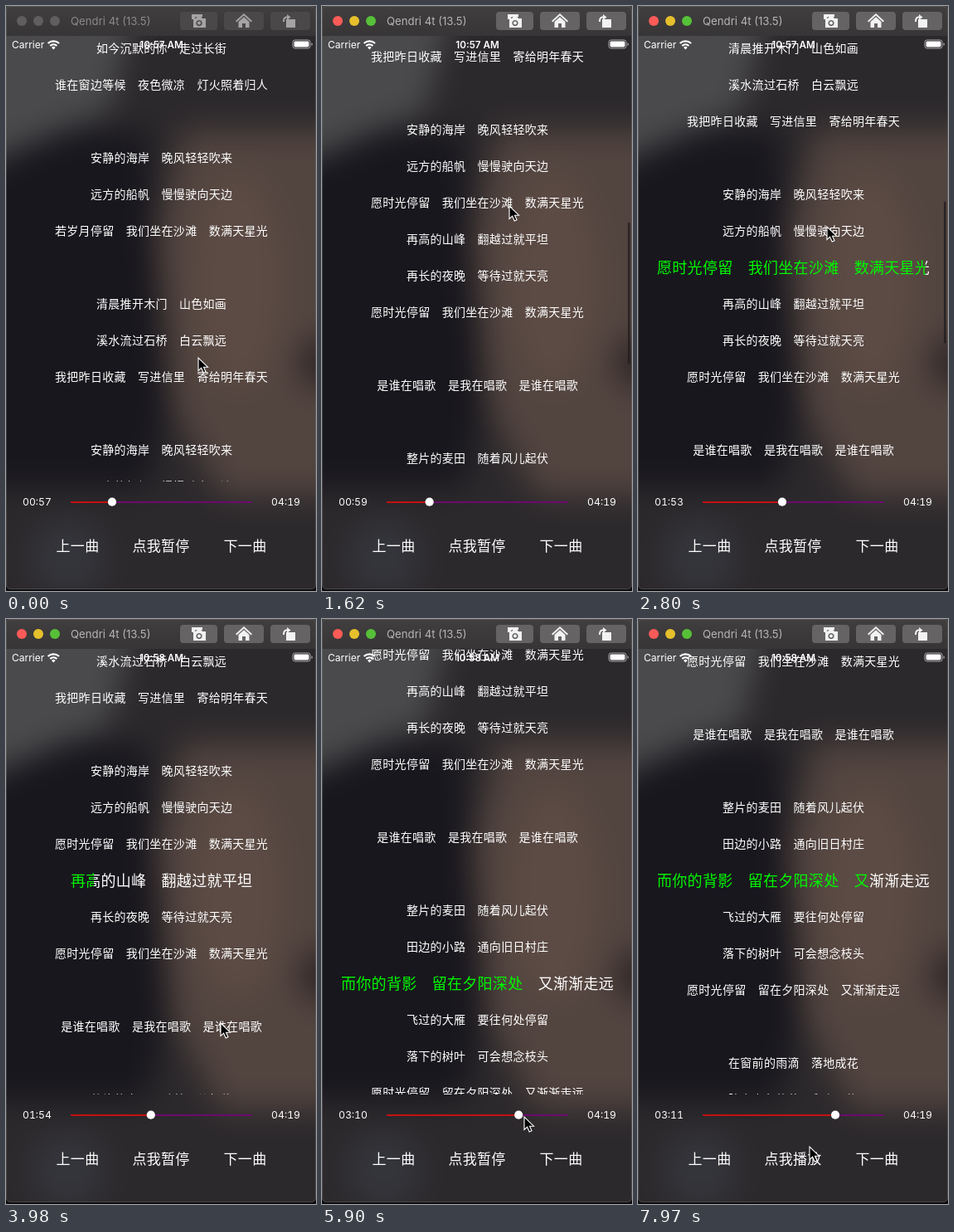
Animation of 374x705 px, one loop 8 s. Source, as an HTML page:

```html
<!DOCTYPE html>
<html lang="zh-CN">
<head>
<meta charset="utf-8">
<style>
html, body { margin: 0; width: 100%; height: 100%; overflow: hidden; background: #0c0c0f; }
svg { display: block; position: absolute; left: 0; top: 0; }
text { fill: #fff; font-family: Inter, "Noto Sans CJK SC", "Noto Sans CJK", sans-serif; font-size: 12px; }
.cjk text { font-family: "Noto Sans CJK SC", "Noto Sans CJK", sans-serif; font-size: 14px; letter-spacing: .28px; text-anchor: middle; }
.cjk .current { font-size: 18px; fill: url(#karaoke); }
.buttons text { font-size: 17px; }
.time { font-size: 12.2px; font-variant-numeric: tabular-nums; }
#title { font-size: 13.2px; fill: #8b898a; }
.light { fill: #605e5f; }
.tool { fill: #4a4849; }
.icon { fill: #a5a3a4; }
.active #title { fill: #b7b5b6; }
.active .tool { fill: #656364; }
.active .icon { fill: #f2f2f2; }
.active .red { fill: #fc5b57; }
.active .yellow { fill: #e6c02c; }
.active .green { fill: #56c038; }
</style>
</head>
<body>
<svg width="374" height="705" style="will-change:transform">
  <defs>
    <filter id="soft" filterUnits="userSpaceOnUse" x="-80" y="-80" width="540" height="870" color-interpolation-filters="sRGB">
      <feGaussianBlur stdDeviation="18"/>
    </filter>
    <clipPath id="window"><rect width="374" height="703" rx="5"/></clipPath>
  </defs>
  <g clip-path="url(#window)">
    <g filter="url(#soft)">
      <path d="M-80 -80H460V790H-80Z" fill="#2c292c"/>
      <path d="M-80 150H170L195 480L170 580H-80Z" fill="#18171d"/>
      <path d="M215 150H460V590H260L200 480L180 280Z" fill="#52443f"/>
      <ellipse cx="280" cy="330" rx="55" ry="130" fill="#5c4b44"/>
      <path d="M-80 -80H175L125 125L-80 215Z" fill="#4a4a4c"/>
      <circle cx="385" cy="430" r="30" fill="#2c2425"/>
      <circle cx="75" cy="665" r="45" fill="#34353b"/>
    </g>
  </g>
</svg>
<svg id="stage" width="374" height="705">
  <defs>
    <clipPath id="page"><rect y="36" width="374" height="537"/></clipPath>
    <linearGradient id="karaoke" gradientUnits="userSpaceOnUse" x1="0" x2="374" y1="0" y2="0">
      <stop class="edge" stop-color="#00f800"/><stop class="edge" stop-color="#fff"/>
    </linearGradient>
    <linearGradient id="bar" x2="0" y2="1"><stop stop-color="#403e3f"/><stop offset="1" stop-color="#373536"/></linearGradient>
  </defs>

  <g clip-path="url(#page)"><g id="lyrics" class="cjk"></g></g>
  <rect id="scrollbar" x="369" width="2.6" height="171" rx="1.3" fill="#1f1b1c" opacity=".75"/>

  <text x="7" y="50.5">Carrier</text>
  <g fill="none" stroke="#fff" stroke-width="2.2">
    <path d="M50.6 45a9.6 9.6 0 0 1 13.4 0M53.2 48a6 6 0 0 1 8.2 0"/>
    <path d="M57.3 52.4L55 49.9a3.4 3.4 0 0 1 4.6 0Z" fill="#fff" stroke="none"/>
  </g>
  <text id="clock" x="187.5" y="50.5" text-anchor="middle" font-weight="600" style="font-size:11.7px"></text>
  <rect x="346" y="41" width="21" height="10" rx="2.6" fill="none" stroke="#aaa"/>
  <rect x="347.5" y="42.5" width="18" height="7" rx="1.4" fill="#fff"/>
  <path d="M368.5 44.2a2 2 0 0 1 0 3.8Z" fill="#aaa"/>

  <text id="elapsed" class="time" x="20" y="602.4"></text>
  <text class="time" x="355" y="602.4" text-anchor="end">04:19</text>
  <path d="M79 598H296" stroke="#6c0a6e" stroke-width="2.2" stroke-linecap="round"/>
  <path id="played" stroke="#c51010" stroke-width="2.2" stroke-linecap="round"/>
  <circle id="knob" cy="597.7" r="5.1" fill="#fff"/>
  <g class="cjk buttons">
    <text x="86.5" y="656.5">上一曲</text>
    <text id="toggle" x="187" y="656.5"></text>
    <text x="288.5" y="656.5">下一曲</text>
  </g>

  <rect width="374" height="36" fill="url(#bar)"/>
  <circle class="light red" cx="19" cy="18" r="6"/>
  <circle class="light yellow" cx="39" cy="18" r="6"/>
  <circle class="light green" cx="59" cy="18" r="6"/>
  <text id="title" x="78" y="22.7">Qendri 4t (13.5)</text>
  <rect class="tool" x="210" y="7" width="45" height="22" rx="4"/>
  <rect class="tool" x="263" y="7" width="48" height="22" rx="4"/>
  <rect class="tool" x="319" y="7" width="48" height="22" rx="4"/>
  <path class="icon" d="M224 10h13v3h-8l-2 3h-3Z"/>
  <path class="icon" fill-rule="evenodd" d="M226 15h3l1.500-2h5l1.500 2h4v11h-15Zm7 2a3.600 3.600 0 1 0 .01 0Zm0 1.600a2 2 0 1 1-.01 0Z"/>
  <path class="icon" d="M287 9l10 9-1.300 1.400L287 11.600l-8.700 7.800L277 18ZM287 13.200l6.500 5.800v7H289v-5h-4v5h-4.500v-7Z"/>
  <path class="icon" d="M338 16h11v10h-11ZM334 19c0-5 2-6.500 5-6.500V10l4.500 3.500-4.500 3.500v-2.500c-2 0-3 .8-3 4.500Z"/>

  <rect x=".5" y=".5" width="373" height="702" rx="5" fill="none" stroke="#777" stroke-opacity=".4"/>
  <path id="cursor" d="M0 0V15.500L3.600 12.200L6.200 18L9 16.800L6.500 11.200H11.500Z" fill="#000" stroke="#fff" stroke-width="1.100"/>
</svg>
<script>
const LOOP = 8000, STEP = 147.5;
const ROW = 44, FIRST_Y = 51, CENTER_X = 187.6, GLYPH = 18.28;
const PAUSE = 7530, DRAG_START = 4580, DRAG_END = 5610, RELEASE = 5720;
const $ = id => document.getElementById(id);

const shore = '安静的海岸　晚风轻轻吹来';
const sail = '远方的船帆　慢慢驶向天边';
const stars = '愿时光停留　我们坐在沙滩　数满天星光';
const lines = [
  '如今沉默的你　走过长街',
  '谁在窗边等候　夜色微凉　灯火照着归人', '',
  shore, sail, '若岁月停留　我们坐在沙滩　数满天星光', '',
  '清晨推开木门　山色如画',
  '溪水流过石桥　白云飘远',
  '我把昨日收藏　写进信里　寄给明年春天', '',
  shore, sail, stars,
  '再高的山峰　翻越过就平坦',
  '再长的夜晚　等待过就天亮',
  stars, '',
  '是谁在唱歌　是我在唱歌　是谁在唱歌', '',
  '整片的麦田　随着风儿起伏',
  '田边的小路　通向旧日村庄',
  '而你的背影　留在夕阳深处　又渐渐走远',
  '飞过的大雁　要往何处停留',
  '落下的树叶　可会想念枝头',
  '愿时光停留　留在夕阳深处　又渐渐走远', '',
  '在窗前的雨滴　落地成花',
  '院中青色的藤　爬上屋檐'
];

// Song position at each seek, and the lines reached, in seconds.
const seeks = [{ at: 0, sec: 57.71 }, { at: 2200, sec: 113 }, { at: RELEASE, sec: 190 }];
const cues = [
  { line: 7, start: 58, length: 5.3 },
  { line: 13, start: 95.88, length: 18 },
  { line: 14, start: 113.88, length: 7.1 },
  { line: 22, start: 177.8, length: 18 }
];
const hand = [
  { from: 0, to: 0, x: 232, y: 424 },
  { from: 295, to: 1040, x: 233, y: 285 },      // drag the lyrics
  { from: 1040, to: 1620, x: 226, y: 241 },
  { from: 2210, to: 2800, x: 228, y: 266 },     // tap a line
  { from: 3250, to: 3980, x: 259, y: 487 },
  { from: 3980, to: DRAG_START, x: 177, y: 598 },
  { from: DRAG_START, to: DRAG_END, x: 244, y: 600 },
  { from: 6200, to: 7240, x: 197, y: 650 },     // pause
  { from: 7820, to: 7965, x: 207, y: 636 }
];

const lastBefore = (list, key, value) => list.filter(item => item[key] <= value).pop();

function ease(t, from, to) {
  const u = Math.min(1, Math.max(0, (t - from) / (to - from || 1)));
  return u * u * (3 - 2 * u);
}

function songAt(t) {
  const seek = lastBefore(seeks, 'at', t);
  return seek.sec + (Math.min(t, PAUSE) - seek.at) / 1000;
}

// Each new line scrolls to the middle in 300 ms; one fling moves the list freely.
function scrollAt(t) {
  return ROW * (ease(t, 290, 590) + ease(t, 3090, 3390) + 8 * ease(t, 5720, 6020))
    + 348 * ease(t, 830, 1690) - 84 * ease(t, 2200, 2510);
}

function handAt(t) {
  return hand.reduce((p, move) => {
    const u = ease(t, move.from, move.to);
    return { x: p.x + (move.x - p.x) * u, y: p.y + (move.y - p.y) * u };
  }, hand[0]);
}

const rows = lines.map(content => {
  const el = document.createElementNS('http://www.w3.org/2000/svg', 'text');
  el.setAttribute('x', CENTER_X);
  el.textContent = content;
  return $('lyrics').appendChild(el);
});

function drawLyrics(t) {
  const song = songAt(t), scroll = scrollAt(t);
  const cue = lastBefore(cues, 'start', song);
  rows.forEach((el, i) => {
    const current = Boolean(cue) && i === cue.line;
    el.classList.toggle('current', current);
    el.setAttribute('y', FIRST_Y + ROW * i + (current ? 18 : 14) * .38);
  });
  if (cue) {
    const width = lines[cue.line].length * GLYPH;
    const edge = CENTER_X + width * ((song - cue.start) / cue.length - .5);
    document.querySelectorAll('.edge').forEach(stop => stop.setAttribute('offset', edge / 374));
  }
  $('lyrics').setAttribute('transform', `translate(0 ${-scroll})`);
  $('scrollbar').setAttribute('y', 136.4 + .322 * scroll);
  $('scrollbar').style.display = t > 700 && t < 3090 ? '' : 'none';
}

function drawPlayer(t) {
  const dragging = t > DRAG_START && t < RELEASE;
  const seconds = dragging ? 115 + 75 * ease(t, DRAG_START, DRAG_END) : Math.floor(songAt(t));
  const knobX = 81.2 + .821 * seconds;
  const pad = n => String(Math.floor(n)).padStart(2, '0');
  $('elapsed').textContent = pad(seconds / 60) + ':' + pad(seconds % 60);
  $('knob').setAttribute('cx', knobX);
  $('played').setAttribute('d', `M79 598H${knobX}`);
  $('toggle').textContent = t < PAUSE ? '点我暂停' : '点我播放';
}

function draw(t) {
  drawLyrics(t);
  drawPlayer(t);
  $('clock').textContent = t < 3700 ? '10:57 AM' : '10:58 AM';
  $('stage').classList.toggle('active', t > 290);
  const { x, y } = handAt(t);
  $('cursor').setAttribute('transform', `translate(${x} ${y})`);
}

let shown = -1;
function tick() {
  const step = Math.floor((performance.now() % LOOP + 10) / STEP);
  if (step !== shown) draw((shown = step) * STEP);
  requestAnimationFrame(tick);
}
tick();
</script>
</body>
</html>
```
